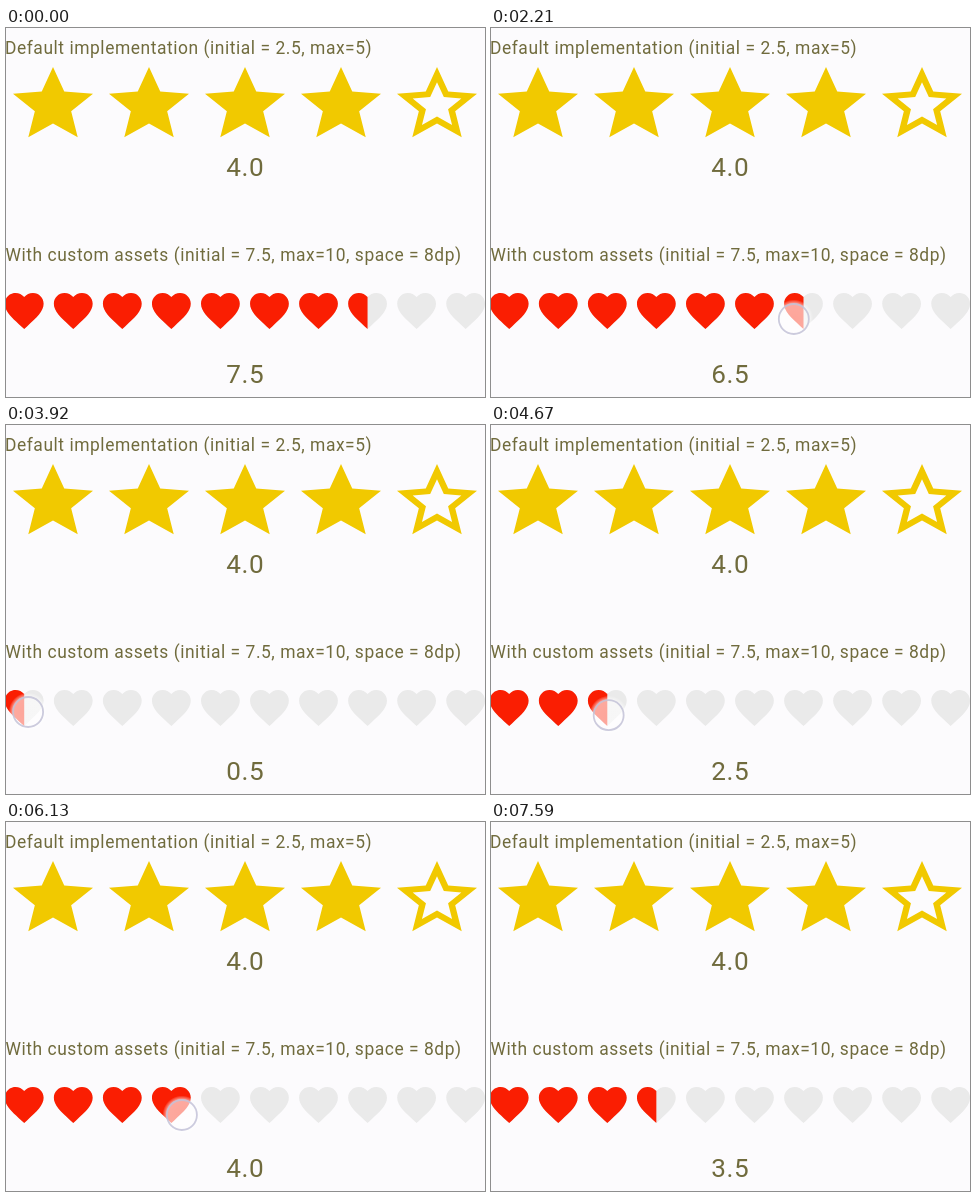
An HTML page that plays this animation: 479x369 px, repeating every 8 s.

```html
<!DOCTYPE html>
<html lang="en">
<head>
<meta charset="utf-8">
<title>Rating bars</title>
<style>
  html, body { margin: 0; width: 100%; height: 100%; overflow: hidden; background: #fcfbfd; }
  svg { display: block; width: 100vw; height: 100vh; }
  text { font-family: Roboto, sans-serif; font-size: 17.43px; letter-spacing: .545px; fill: #706b3d; white-space: pre; }
  .value { font-size: 26.14px; text-anchor: middle; }
</style>
</head>
<body>
<svg viewBox="0 0 479 369">
  <defs>
    <path id="star" d="M12 17.27 18.18 21l-1.64-7.03L22 9.24l-7.19-.61L12 2 9.19 8.63 2 9.24l5.46 4.73L5.82 21z"/>
    <path id="starLine" d="M22 9.24l-7.19-.62L12 2 9.19 8.63 2 9.24l5.46 4.73L5.82 21 12 17.27 18.18 21l-1.63-7.03zM12 15.4l-3.76 2.27 1-4.28-3.32-2.88 4.38-.38L12 6.1l1.71 4.04 4.38.38-3.32 2.88 1 4.28z"/>
    <path id="heart" d="M12 21.35l-1.45-1.32C5.4 15.36 2 12.28 2 8.5 2 5.42 4.42 3 7.5 3c1.74 0 3.41.81 4.5 2.09C13.09 3.81 14.76 3 16.5 3 19.58 3 22 5.42 22 8.5c0 3.78-3.4 6.86-8.55 11.54z"/>
    <clipPath id="filled"><rect id="fillBox" y="255" width="0" height="60"/></clipPath>
    <radialGradient id="glow">
      <stop offset="0" stop-color="#fff" stop-opacity=".6"/>
      <stop offset=".78" stop-color="#fff" stop-opacity=".62"/>
      <stop offset="1" stop-color="#fff" stop-opacity="0"/>
    </radialGradient>
  </defs>
  <text x="-1" y="26">Default implementation (initial = 2.5, max=5)</text>
  <g id="stars" fill="#f1c900"></g>
  <text class="value" x="239.3" y="148">4.0</text>
  <text x="-.5" y="233">With custom assets (initial = 7.5, max=10, space = 8dp)</text>
  <g id="empty" fill="#eaeaea"></g>
  <g clip-path="url(#filled)"><g id="full" fill="#fa1e02"></g></g>
  <text class="value" id="value" x="239.3" y="355">7.5</text>
  <g id="touch">
    <circle r="19.5" fill="url(#glow)"/>
    <circle r="15" fill="none" stroke="#c3c2d8" stroke-opacity=".85" stroke-width="1.8"/>
  </g>
</svg>
<script>
const LOOP = 8000, DOWN = 2040, UP = 7130;
const $ = id => document.getElementById(id);
const heartX = i => 18.2 + 49.05 * i;

// Finger path: time, x, y
const path = [
  [2040, 338, 291], [2210, 303, 291], [2840, 188, 281], [3450, 50, 284],
  [3740, 19, 286], [3920, 22, 287], [4500, 100, 289], [4630, 112, 290],
  [5380, 220, 292], [5560, 228, 293], [6130, 176, 293], [6250, 167, 291.5],
  [6340, 165.5, 291], [6540, 165, 291], [7130, 151, 291]
];

function addIcon(parent, id, cx, top, sx, sy, iconTop) {
  const use = document.createElementNS("http://www.w3.org/2000/svg", "use");
  use.setAttribute("href", "#" + id);
  use.setAttribute("transform", `translate(${cx} ${top}) scale(${sx} ${sy}) translate(-12 ${-iconTop})`);
  parent.append(use);
}

for (let i = 0; i < 5; i++) addIcon($("stars"), i < 4 ? "star" : "starLine", 47 + 96 * i, 39, 4, 3.7, 2);
for (let i = 0; i < 10; i++)
  for (const layer of ["empty", "full"]) addIcon($(layer), "heart", heartX(i), 265, 1.94, 1.96, 3);

function slope(i, k) {
  const a = path[Math.max(i - 1, 0)], b = path[Math.min(i + 1, path.length - 1)];
  return (b[k] - a[k]) / (b[0] - a[0]);
}

// Cubic Hermite through the path points
function fingerAt(t) {
  let i = 0;
  while (i < path.length - 2 && t >= path[i + 1][0]) i++;
  const a = path[i], b = path[i + 1], d = b[0] - a[0], u = (t - a[0]) / d;
  return [1, 2].map(k => {
    const h = u * u * (3 - 2 * u), m = 1 - u;
    return a[k] + (b[k] - a[k]) * h + d * u * m * (m * slope(i, k) - u * slope(i + 1, k));
  });
}

function ratingAt(t) {
  if (t < DOWN) return 7.5;
  const x = fingerAt(Math.min(t, UP))[0];
  return Math.min(10, Math.max(0, Math.ceil(x / 47.9 * 2) / 2));
}

function draw(t) {
  const rating = ratingAt(t), whole = Math.floor(rating);
  $("fillBox").setAttribute("width", rating > whole ? heartX(whole) : Math.max(0, heartX(whole - 1) + 24));
  $("value").textContent = rating.toFixed(1);
  const down = t >= DOWN && t < UP;
  $("touch").setAttribute("visibility", down ? "visible" : "hidden");
  if (down) $("touch").setAttribute("transform", `translate(${fingerAt(t)})`);
}

function tick() {
  draw(performance.now() % LOOP);
  requestAnimationFrame(tick);
}
tick();
</script>
</body>
</html>
```
